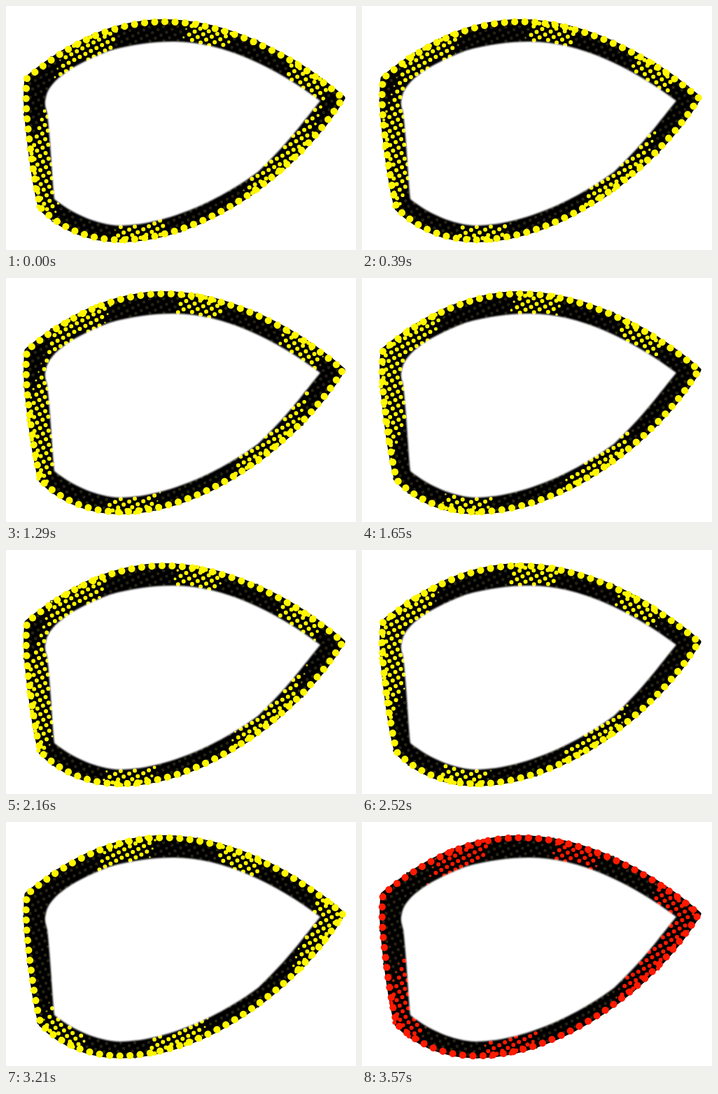
These frames come from a looping animation (500x350 px, 3.6 s). An HTML page with a canvas:

```html
<!DOCTYPE html>
<html lang="en">
<head>
<meta charset="utf-8">
<title>Halftone bubble</title>
<style>
html, body { margin: 0; width: 500px; height: 350px; overflow: hidden; background: #fff; }
canvas { display: block; }
</style>
</head>
<body>
<canvas id="stage" width="500" height="350"></canvas>
<script>
const LOOP = 3600, STEP = 30, RED_AT = 3240;
const YELLOW = '#fff700', RED = '#ff1a00', DARK = '#252214';
const RIM_DOTS = 83, RIM_CYCLE = 280;
const STRIPE = { gap: 164, half: 37, slope: 0.35, start: 304, cycle: 440 };
const GRID = { pitch: 9, angle: -28 * Math.PI / 180 };

const rimData = `M30 104 C85 58 150 22.5 226 22.5 C310 22.5 405 66 481 132
  C420 232 288 335 163 335.5 C120 335.5 80 320 50 290
  C44 270 38 230 35 206 C32 180 26 140 30 104Z`;
const holeData = `M69 277 C66 250 64 200 59 155 C57 146 54 141 57 131
  C60 112 85 88 148 64 C180 55 210 51 240 51 C310 51 385 88 449 136
  C425 165 405 195 360 238 C320 268 240 314 163 315 C130 314 95 298 69 277Z`;

const ctx = document.getElementById('stage').getContext('2d');
const rim = new Path2D(rimData), hole = new Path2D(holeData);

const probe = document.createElementNS('http://www.w3.org/2000/svg', 'path');
probe.setAttribute('d', rimData);
const gap = probe.getTotalLength() / RIM_DOTS;

// Halftone dots that fall on the band
const dots = [];
const ax = GRID.pitch * Math.cos(GRID.angle), ay = GRID.pitch * Math.sin(GRID.angle);
ctx.lineWidth = 6;
for (let i = -60; i <= 60; i++) {
  for (let j = -60; j <= 60; j++) {
    const x = 253 + i * ax - j * ay, y = 178 + i * ay + j * ax;
    const onBand = ctx.isPointInPath(rim, x, y) || ctx.isPointInStroke(rim, x, y);
    if (onBand && !ctx.isPointInPath(hole, x, y)) dots.push({ x, y });
  }
}

function fillDots(color, radius) {
  ctx.fillStyle = color;
  ctx.beginPath();
  for (const d of dots) {
    const r = radius(d);
    if (r <= 0) continue;
    ctx.moveTo(d.x + r, d.y);
    ctx.arc(d.x, d.y, r, 0, 7);
  }
  ctx.fill();
}

// Distance from the centre line of the nearest diagonal stripe
function stripeDistance(d, t) {
  const u = (d.x + STRIPE.slope * d.y - STRIPE.start) / STRIPE.gap - t / STRIPE.cycle;
  return Math.abs(u - Math.round(u)) * STRIPE.gap;
}

function draw(t) {
  const color = t >= RED_AT ? RED : YELLOW;
  ctx.fillStyle = '#fff';
  ctx.fillRect(0, 0, 500, 350);

  ctx.fillStyle = ctx.strokeStyle = '#000';
  ctx.lineJoin = 'round';
  ctx.lineWidth = 7;
  ctx.fill(rim);
  ctx.stroke(rim);

  fillDots(DARK, () => 2.3);
  fillDots(color, d => 3 * Math.min(1, (STRIPE.half - stripeDistance(d, t)) / 6));

  ctx.save();
  ctx.filter = 'blur(1.3px)';
  ctx.fillStyle = '#fff';
  ctx.fill(hole);
  ctx.restore();

  ctx.save();
  ctx.strokeStyle = color;
  ctx.lineCap = 'round';
  ctx.lineWidth = 10.2;
  ctx.setLineDash([0.01, gap - 0.01]);
  ctx.lineDashOffset = -(t / RIM_CYCLE % 1) * gap;
  ctx.stroke(rim);
  ctx.restore();
}

const start = performance.now();
function tick() {
  const t = (performance.now() - start) % LOOP;
  draw(Math.floor(t / STEP) * STEP);
  requestAnimationFrame(tick);
}
tick();
</script>
</body>
</html>
```
